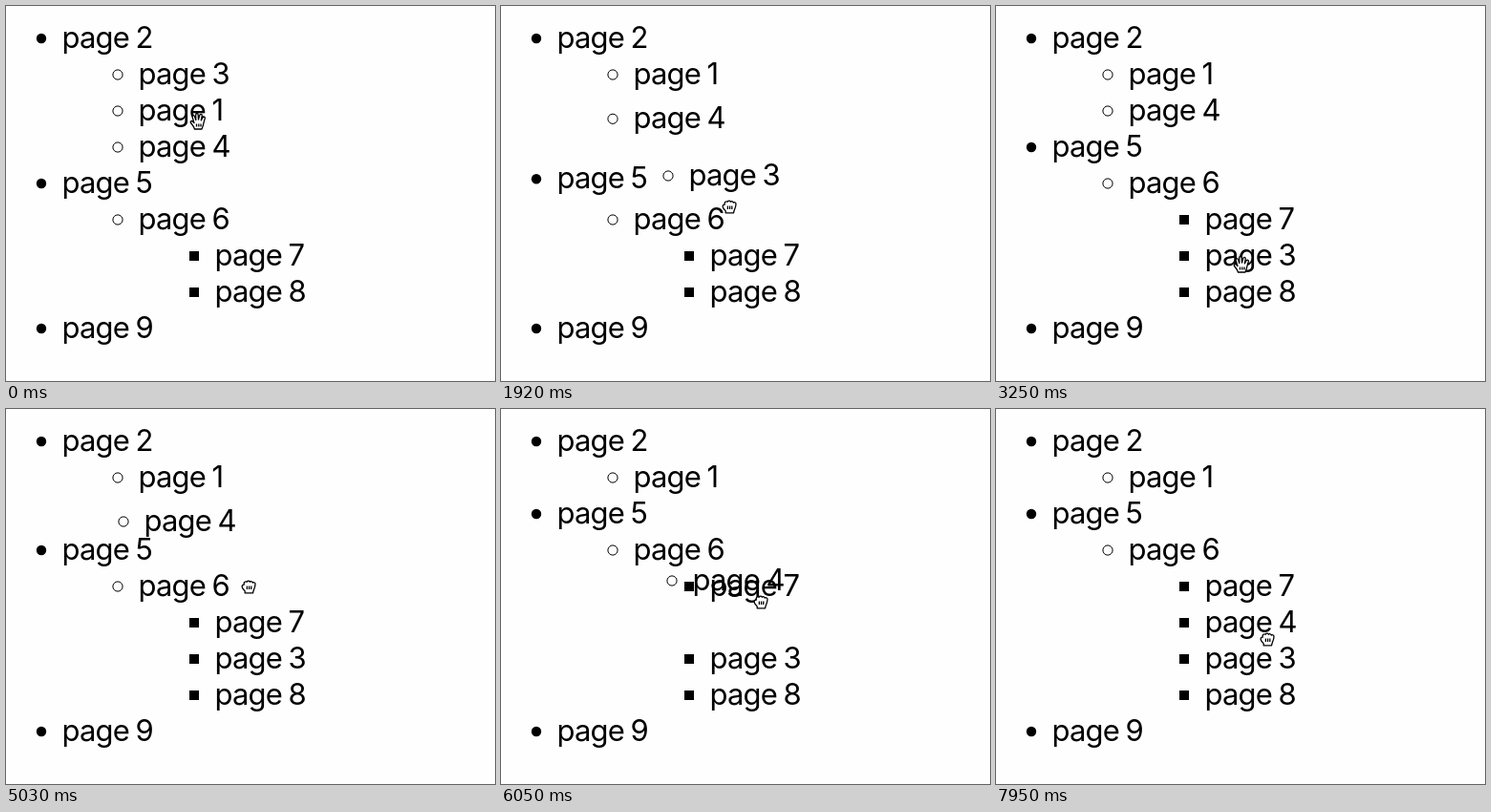
Write an HTML page that moves like this. It is 512 px wide and 393 px high and loops after 8000 ms.

```html
<!DOCTYPE html>
<html lang="en">
<head>
<meta charset="utf-8">
<title>Page list</title>
<style>
  html, body { margin: 0; width: 100%; height: 100%; overflow: hidden; background: #fefefe; }
  svg { display: block; width: 512px; height: 393px; }
  text { font: 400 31px Inter, "Liberation Sans", sans-serif; letter-spacing: -.85px; word-spacing: -1.4px; }
  .hand { fill: #fff; stroke: #000; stroke-width: 1.3; stroke-linejoin: round; }
</style>
</head>
<body>
<svg id="stage" viewBox="0 0 512 393"></svg>
<script>
const LOOP = 8000;
const TICK = 147.2; // the picture changes on this beat; all times below count beats

const order = [2, 3, 1, 4, 5, 6, 7, 8, 9];
const levels = [0, 1, 1, 1, 0, 1, 2, 2, 0];

// Paths are [beat, x, y]; grip is the hand's offset from the dragged text.
const drags = [
  { page: 3, from: 1, to: 6, level: 2, grab: 8, drop: 21, grip: [42, 32],
    path: [[11, 146, 82], [13, 197, 178], [17, 223, 242], [20, 222, 247]] },
  { page: 4, from: 2, to: 5, level: 2, grab: 28, drop: 47, grip: [71, 22],
    path: [[34, 145, 118], [35, 183, 164], [38, 199, 206], [41, 201, 180], [45, 221, 224]] }
];
const strokes = [
  [[0, 201, 121], [3, 242, 164], [6, 140, 54], [8, 176, 88]],
  [[21, 258, 272], [22, 257, 271], [25, 201, 127]],
  [[27, 200, 120], [28, 200, 121]],
  [[47, 293, 245], [52, 284, 197]],
  [[54, 284, 241]]
];
const LAST_GRAB = 54;

const SHIFT = { delay: .4, gap: .65, length: 1.36 };

const clamp = v => Math.min(1, Math.max(0, v));
const smooth = p => p * p * (3 - 2 * p);
const rowY = row => 34 + 38 * row;
const levelX = level => 59 + 80 * level;

function along(path, t) {
  const i = path.findIndex(p => p[0] > t);
  if (i < 0) return path[path.length - 1].slice(1);
  if (i === 0) return path[0].slice(1);
  const [t0, x0, y0] = path[i - 1], [t1, x1, y1] = path[i];
  const p = (t - t0) / (t1 - t0);
  return [x0 + (x1 - x0) * p, y0 + (y1 - y0) * p];
}

function add(parent, tag, attrs = {}) {
  const el = document.createElementNS('http://www.w3.org/2000/svg', tag);
  for (const key in attrs) el.setAttribute(key, attrs[key]);
  return parent.appendChild(el);
}

const place = (el, [x, y]) => el.setAttribute('transform', `translate(${x} ${y})`);
const show = (el, on) => el.setAttribute('visibility', on ? 'visible' : 'hidden');

const stage = document.getElementById('stage');
const pages = order.map((name, row) => {
  const el = add(stage, 'g');
  const marks = [
    add(el, 'circle', { cx: -22, r: 5.2 }),
    add(el, 'circle', { cx: -22, r: 5.1, fill: 'none', stroke: '#000' }),
    add(el, 'rect', { x: -27, y: -5, width: 10, height: 10 })
  ];
  add(el, 'text', { x: -.4, y: 10 }).textContent = 'page ' + name;
  return { name, row, level: levels[row], el, marks };
});
for (const { page } of drags) stage.append(pages.find(p => p.name === page).el);

const hand = d => add(stage, 'path', { class: 'hand', d });
const openHand = hand('M-3.5 8C-4 5.5-6 3.5-7.5 1.5C-8.5-.3-6.5-1.2-5.2.3L-4 1.6L-5.8-4.4' +
  'C-6.3-6.6-4-7.1-3.4-5L-2.2-1.5L-2.3-7C-2.3-9 .1-9 .2-7L.5-2L1.8-6.6C2.3-8.4 4.6-7.8 4.2-5.9' +
  'L3.3-1.2L5-4C6-5.6 8-4.6 7.2-2.8C5.8.5 6 4 4 8ZM-1.5 2.5v3M.8 2.5v3M3 2.5v3');
const closedHand = hand('M-3.8 6.8V4.8L-6.2 2C-7.6-.2-6.6-2-4.8-1.8V-3.4A1.9 1.9 0 0 1-1.8-4.8' +
  'A1.8 1.8 0 0 1 1.4-4.8A1.8 1.8 0 0 1 4.4-3.9A1.6 1.6 0 0 1 7-2.4C7 1.4 5 3 4.6 6.8Z' +
  'M-1.6-.5v3.5M.6-.5v3.5M2.8-.5v3.5');

// Pages between a drag's ends close the gap one after another.
function pose(page, t) {
  let { row, level } = page;
  for (const d of drags) {
    const start = d.path[0][0];
    if (t < start) break;
    if (d.page === page.name) {
      if (t < d.drop) return { at: along(d.path, t), level };
      row = d.to;
      level = d.level;
    } else if (row > d.from && row <= d.to) {
      const begin = start + SHIFT.delay + SHIFT.gap * (row - d.from - 1);
      row -= smooth(clamp((t - begin) / SHIFT.length));
    }
  }
  return { at: [levelX(level), rowY(row)], level };
}

function handAt(t) {
  const d = drags.find(d => t >= d.path[0][0] && t < d.drop);
  if (!d) return along(strokes.findLast(s => s[0][0] <= t), t);
  // the hand is a beat ahead when the page starts to follow
  const [x, y] = along(d.path, Math.max(t, d.path[0][0] + 1));
  return [x + d.grip[0], y + d.grip[1]];
}

function draw(time) {
  const t = Math.floor(time / TICK);
  for (const page of pages) {
    const { at, level } = pose(page, t);
    place(page.el, at);
    page.marks.forEach((mark, i) => show(mark, i === level));
  }
  const closed = t >= LAST_GRAB || drags.some(d => t >= d.grab && t < d.drop);
  for (const el of [openHand, closedHand]) place(el, handAt(t));
  show(openHand, !closed);
  show(closedHand, closed);
}

const begin = performance.now();
function frame() {
  draw((performance.now() - begin) % LOOP);
  requestAnimationFrame(frame);
}
frame();
</script>
</body>
</html>
```
